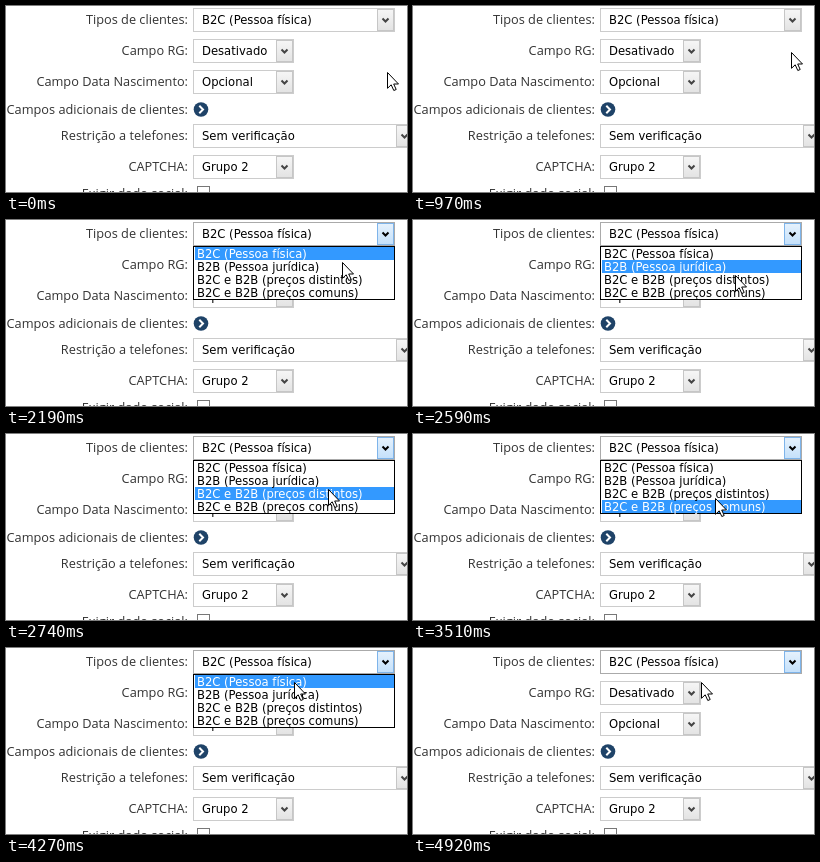
Write an HTML page that moves like this. It is 401x186 px and loops after 6.14 s.

```html
<!DOCTYPE html>
<html lang="pt">
<head>
<meta charset="utf-8">
<style>
html, body { margin: 0; width: 100%; height: 100%; overflow: hidden; background: #fff; }
svg { display: block; width: 401px; height: 186px; }
.label { font: 12.75px "Open Sans", sans-serif; fill: #333; text-anchor: end; }
.value { font: 11.6px "DejaVu Sans", sans-serif; fill: #000; }
</style>
</head>
<body>
<svg id="stage" viewBox="0 0 401 186">
  <defs>
    <linearGradient id="plain" x2="0" y2="1">
      <stop stop-color="#f6f6f6"/><stop offset="1" stop-color="#e3e3e3"/>
    </linearGradient>
    <linearGradient id="active" x2="0" y2="1">
      <stop stop-color="#e6f2fd"/><stop offset="1" stop-color="#c4e0fa"/>
    </linearGradient>
  </defs>
</svg>
<script>
const LOOP = 6140;
const stage = document.getElementById('stage');

function add(parent, tag, attrs, text) {
  const node = document.createElementNS('http://www.w3.org/2000/svg', tag);
  set(node, attrs);
  if (text) node.textContent = text;
  parent.appendChild(node);
  return node;
}

function set(node, attrs) {
  for (const key in attrs) node.setAttribute(key, attrs[key]);
}

const label = (text, y) => add(stage, 'text', { class: 'label', x: 182, y }, text);

function select(text, top, right) {
  const box = add(stage, 'rect', {
    x: 187.5, y: top + .5, width: right - 188, height: 23, fill: '#fff', stroke: '#ccc'
  });
  add(stage, 'text', { class: 'value', x: 196, y: top + 16 }, text);
  const button = add(stage, 'rect', {
    x: right - 17.5, y: top + 1.5, width: 16, height: 21, fill: 'url(#plain)', stroke: '#c6c6c6'
  });
  const arrow = add(stage, 'path', {
    d: `M${right - 12.5} ${top + 10.5}l3 3 3-3`, fill: 'none', stroke: '#444', 'stroke-width': 2
  });
  return { box, button, arrow };
}

label('Tipos de clientes:', 18);
label('Campo RG:', 49);
label('Campo Data Nascimento:', 80);
label('Campos adicionais de clientes:', 108);
label('Restrição a telefones:', 134);
label('CAPTCHA:', 165);
label('Exigir dado social:', 192);

const clientType = select('B2C (Pessoa física)', 2, 389);
select('Desativado', 33, 288);
select('Opcional', 64, 288);
select('Sem verificação', 118, 408);
select('Grupo 2', 149, 288);

add(stage, 'circle', { cx: 195, cy: 103.5, r: 7.3, fill: '#1f4368' });
add(stage, 'path', { d: 'M193.3 99.8l3.7 3.7-3.7 3.7', fill: 'none', stroke: '#fff', 'stroke-width': 2 });
add(stage, 'rect', { x: 191.5, y: 180.5, width: 12, height: 12, fill: '#fff', stroke: '#777' });

// Open list
const menu = add(stage, 'g', {});
add(menu, 'rect', { x: 187.5, y: 26.5, width: 201, height: 53, fill: '#fff', stroke: '#000' });
const marker = add(menu, 'rect', { x: 189, width: 199, height: 13, fill: '#39f' });
const options = [
  'B2C (Pessoa física)',
  'B2B (Pessoa jurídica)',
  'B2C e B2B (preços distintos)',
  'B2C e B2B (preços comuns)'
].map((text, i) => add(menu, 'text', { class: 'value', x: 191, y: 38 + 13 * i }, text));

const cursor = add(stage, 'path', {
  d: 'M.5 .5V16.3L4.2 12.8 6.8 18.5 9.2 17.5 6.7 12H11.5Z', fill: '#fff', stroke: '#000'
});

// Each step: start time, pointer x, pointer y, highlighted option (-1 = list closed)
const steps = [
  [0, 381, 66, -1], [970, 378, 46, -1], [1120, 374, 28, -1], [1240, 376, 18, -1],
  [1520, 376, 18, 0], [1920, 362, 29, 0], [2070, 349, 36, 0], [2190, 336, 42, 0],
  [2310, 334, 44, 1], [2590, 322, 55, 1], [2740, 322, 55, 2],
  [2990, 318, 68, 2], [3110, 314, 74, 3], [3510, 302, 64, 3],
  [3630, 297, 56, 2], [3750, 291, 47, 2], [3870, 288, 40, 1],
  [4270, 288, 34, 0], [4920, 288, 34, -1]
];
const FOCUS_TIME = 1520;

function render(time) {
  const [, x, y, picked] = steps.filter(step => step[0] <= time).pop();
  const focused = time >= FOCUS_TIME;
  set(cursor, { transform: `translate(${x} ${y})` });
  set(menu, { visibility: picked < 0 ? 'hidden' : 'visible' });
  set(marker, { y: 27 + 13 * Math.max(picked, 0) });
  options.forEach((option, i) => { option.style.fill = i === picked ? '#fff' : '#000'; });
  set(clientType.box, { stroke: focused ? '#aaa' : '#ccc' });
  set(clientType.button, {
    fill: focused ? 'url(#active)' : 'url(#plain)',
    stroke: focused ? '#7eb4ea' : '#c6c6c6'
  });
  set(clientType.arrow, { stroke: focused ? '#000' : '#444' });
}

const start = performance.now();
function tick() {
  render((performance.now() - start) % LOOP);
  requestAnimationFrame(tick);
}
tick();
</script>
</body>
</html>
```
